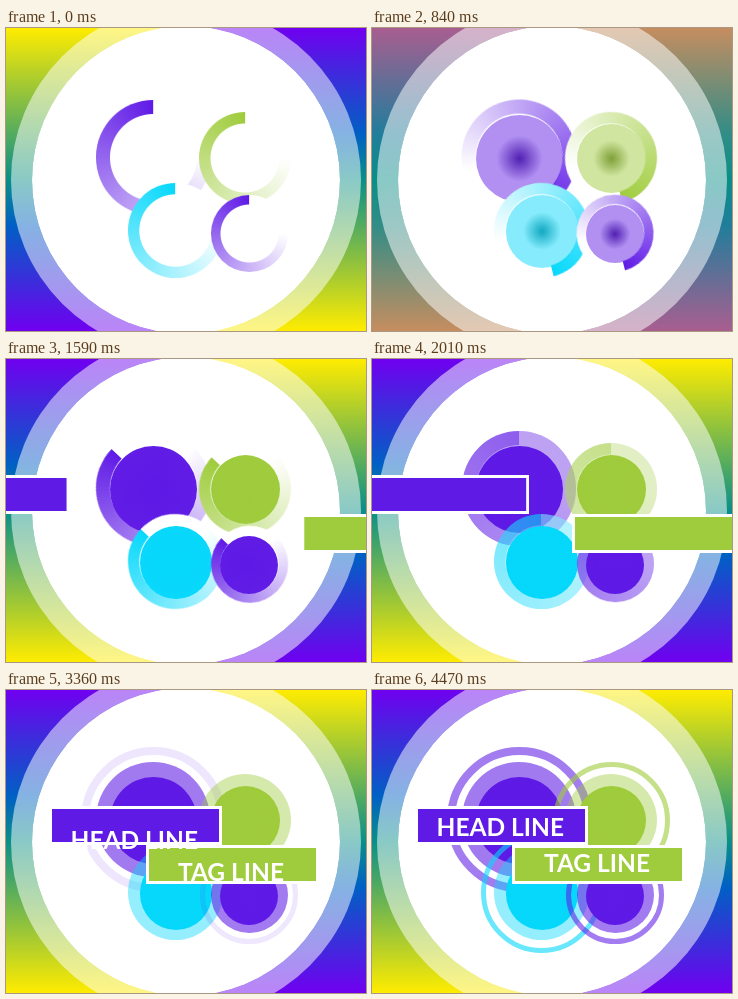
An HTML page for the animation above (4500 ms loop, 360 by 303 pixels).

```html
<!DOCTYPE html>
<html lang="en">
<head>
<meta charset="utf-8">
<title>Head line</title>
<style>
html, body { margin: 0; width: 100%; height: 100%; overflow: hidden; background: #fff; }
.stage { position: relative; width: 360px; height: 303px; overflow: hidden; --loop: 4.5s linear infinite; }
.stage *, .stage *::before, .stage *::after { position: absolute; box-sizing: border-box; }

/* Two mirrored halves, each cross-fading to its own reverse */
.half { top: 0; width: 180px; height: 303px; --stops: #7000f0, #0060c4 35%, #0a8f88 50%, #ffec00; }
.half::before, .half::after { content: ""; inset: 0; background: linear-gradient(var(--to), var(--stops)); }
.half::before { --to: 0deg; }
.half::after { --to: 180deg; animation: swap var(--loop); }
.half + .half { left: 180px; transform: scaleY(-1); }
@keyframes swap { 0% { opacity: 0 } 31.1%, 100% { opacity: 1 } }

.plate {
  left: 5px; top: -23px; width: 350px; height: 350px; border-radius: 50%;
  border: 21px solid rgba(255, 255, 255, .52); background: #fff padding-box;
}

.dot { left: var(--x); top: var(--y); width: 0; height: 0; }
.dot * { border-radius: 50%; left: calc(-1 * var(--s)); top: calc(-1 * var(--s)); width: calc(2 * var(--s)); height: calc(2 * var(--s)); }
.band, .sweep { --s: var(--outer); }
.band { background: var(--c); animation: band var(--loop); }
.sweep {
  background:
    radial-gradient(circle, #fff calc(var(--inner) - .5px), transparent calc(var(--inner) + .5px)),
    conic-gradient(#fff 90deg, var(--c) 360deg);
  animation: turn var(--loop), clear var(--loop);
}
.fill, .core { --s: var(--inner); margin: .7px 0 0 .2px; }
.fill { background: var(--c); animation: fill var(--loop); }
.core {
  -webkit-mask: radial-gradient(closest-side, #000, transparent);
  mask: radial-gradient(closest-side, #000, transparent);
  animation: core var(--loop);
}
.line { --s: var(--far); border: var(--w) solid var(--c); animation: var(--show) var(--loop); }

@keyframes band { 0%, 36% { opacity: 0 } 37.8%, 100% { opacity: var(--a) } }
@keyframes turn { 0% { transform: rotate(0) } 40.6%, 100% { transform: rotate(360deg) } }
@keyframes clear { 0%, 37.8% { opacity: 1 } 44.7% { opacity: .3 } 64%, 100% { opacity: 0 } }
@keyframes fill { 0%, 2.4% { opacity: 0 } 36%, 100% { opacity: 1 } }
@keyframes core {
  0% { transform: scale(0); background-color: #222; opacity: .7 }
  18.7% { background-color: color-mix(in srgb, var(--c) 74%, #000); opacity: .9 }
  35.6%, 100% { transform: scale(1); background-color: var(--c); opacity: 1 }
}
@keyframes early { 0%, 72% { opacity: 0 } 86.7%, 100% { opacity: .57 } }
@keyframes late { 0%, 82.2% { opacity: 0 } 99.3%, 100% { opacity: .6 } }

.violet { --c: #5f1ae6; --a: .58; --show: early; }
.lime { --c: #9fcc3c; --a: .42; --show: late; }
.cyan { --c: #06d8fb; --a: .43; --show: late; }
.big { --x: 147px; --y: 129.5px; --outer: 57.3px; --inner: 43.5px; --far: 72.5px; --w: 8px; }
.lime.dot { --x: 239px; --y: 130px; --outer: 46px; --inner: 34.5px; --far: 58.5px; --w: 5px; }
.cyan.dot { --x: 169.5px; --y: 202.7px; --outer: 47.5px; --inner: 36.2px; --far: 60.3px; --w: 5px; }
.small { --x: 243.3px; --y: 205px; --outer: 38.3px; --inner: 29px; --far: 49px; --w: 5px; }

.bar { width: 173px; height: 39px; border: 3px solid #fff; background: var(--c); animation: slide var(--loop); }
.head { left: 43px; top: 116px; --from: -216px; }
.tag { left: 140px; top: 155px; --from: 220px; }
@keyframes slide {
  0%, 30.67% { transform: translateX(var(--from)); animation-timing-function: cubic-bezier(.333, .667, .667, 1) }
  60%, 100% { transform: none }
}

svg { left: 0; top: 0; }
text { font: 700 24.5px Lato, sans-serif; fill: #fff; text-anchor: middle; animation: rise var(--loop); }
@keyframes rise {
  0%, 47.8% { transform: translateY(var(--drop)); animation-timing-function: cubic-bezier(.333, .667, .667, 1) }
  84%, 100% { transform: translateY(0) }
}
</style>
</head>
<body>
<div class="stage">
  <div class="half"></div>
  <div class="half"></div>
  <div class="plate"></div>

  <div class="dot violet big"><i class="band"></i><i class="sweep"></i><i class="fill"></i><i class="core"></i><i class="line"></i></div>
  <div class="dot lime"><i class="band"></i><i class="sweep"></i><i class="fill"></i><i class="core"></i><i class="line"></i></div>
  <div class="dot cyan"><i class="band"></i><i class="sweep"></i><i class="fill"></i><i class="core"></i><i class="line"></i></div>
  <div class="dot violet small"><i class="band"></i><i class="sweep"></i><i class="fill"></i><i class="core"></i><i class="line"></i></div>

  <div class="bar violet head"></div>
  <div class="bar lime tag"></div>

  <svg width="360" height="303">
    <text x="128.3" y="146" style="--drop: 190px">HEAD LINE</text>
    <text x="225" y="182" style="--drop: 140px">TAG LINE</text>
  </svg>
</div>
</body>
</html>
```
